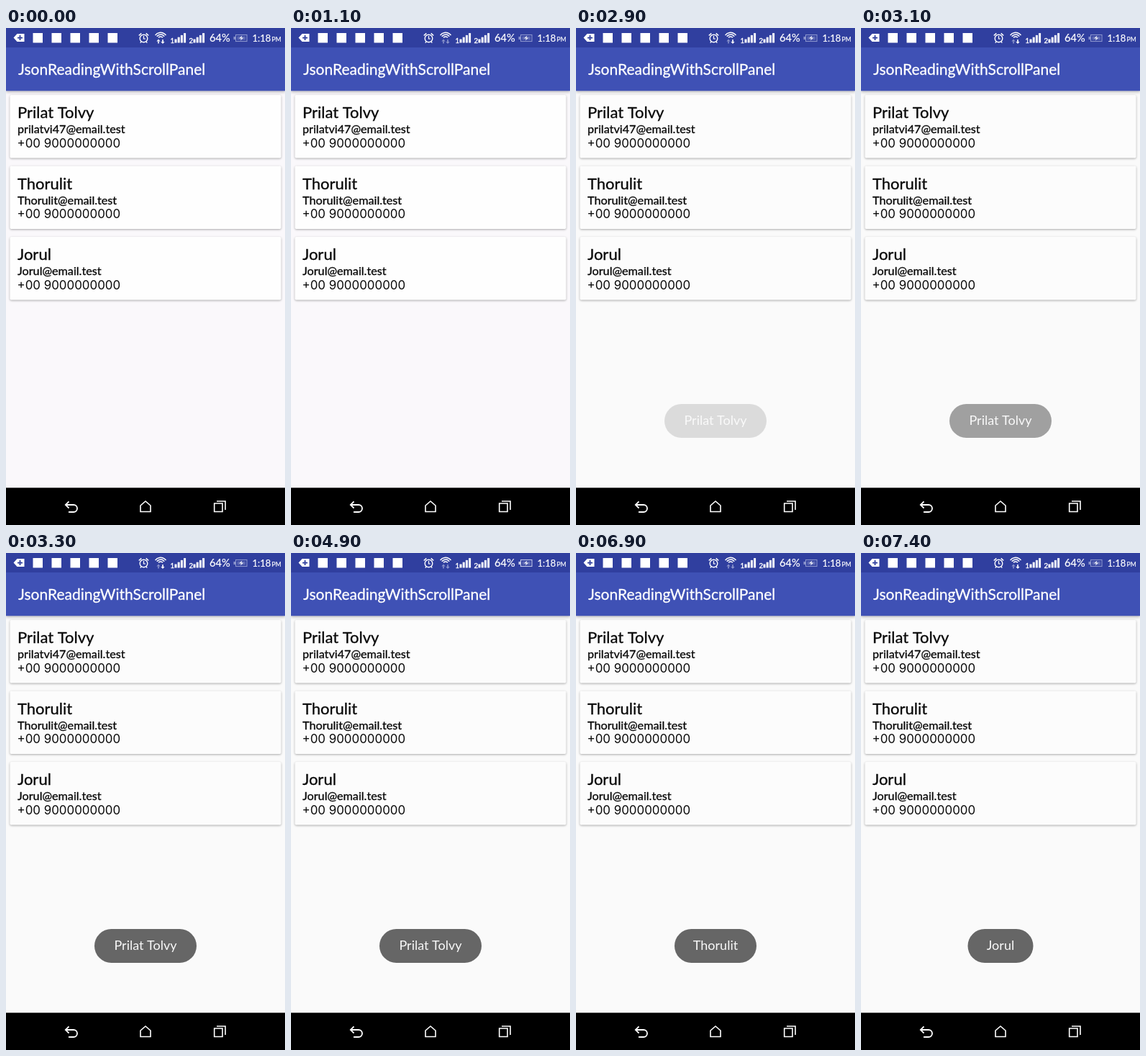
An HTML page with a canvas that plays this animation: 388 px wide and 690 px high, repeating every 8000 ms.

```html
<!DOCTYPE html>
<html lang="en">
<head>
<meta charset="utf-8">
<title>Contact list</title>
<style>
html, body { margin: 0; width: 100%; height: 100%; overflow: hidden; background: #000; }
canvas { display: block; width: 388px; height: 690px; }
</style>
</head>
<body>
<canvas id="stage"></canvas>
<script>
const W = 388, H = 690, LOOP = 8000, STEP = 100;
const BAR_END = 87.3, NAV_TOP = 638.3;
const SANS = 'Lato, "Open Sans", sans-serif';
const DIGITS = 'Inter, "Open Sans", sans-serif';
const ratio = window.devicePixelRatio || 1;

function setup(canvas) {
  canvas.width = W * ratio;
  canvas.height = H * ratio;
  const ctx = canvas.getContext('2d');
  ctx.scale(ratio, ratio);
  return ctx;
}

const screen2d = setup(document.getElementById('stage'));
const layer2d = setup(document.createElement('canvas'));
let c = screen2d;

const people = [
  { name: 'Prilat Tolvy', mail: 'prilatvi47@email.test' },
  { name: 'Thorulit', mail: 'Thorulit@email.test' },
  { name: 'Jorul', mail: 'Jorul@email.test' }
];
const PHONE = '+00 9000000000';

// fade-in start/end and fade-out start/end, in ms
const toasts = [
  { text: people[0].name, w: 142, show: [2800, 3300], hide: [5000, 5400] },
  { text: people[1].name, w: 114, show: [4900, 5300], hide: [6980, 7400] },
  { text: people[2].name, w: 91, show: [6900, 7300], hide: [9000, 9400] }
];

const ramp = (t, [a, b]) => Math.min(1, Math.max(0, (t - a) / (b - a)));
const within = (t, a, b) => t >= a && t < b;

function rect(x, y, w, h, color) {
  c.fillStyle = color;
  c.fillRect(x, y, w, h);
}

// weight is the width of an extra outline that thickens the letters
function text(s, x, y, size, color, { family = SANS, align = 'left', weight = 0 } = {}) {
  c.font = `${size}px ${family}`;
  c.textAlign = align;
  c.fillStyle = c.strokeStyle = color;
  c.fillText(s, x, y);
  if (!weight) return;
  c.lineWidth = weight;
  c.lineJoin = 'round';
  c.strokeText(s, x, y);
  c.lineJoin = 'miter';
}

function line(points, width, color = '#fff', closed = false) {
  c.beginPath();
  points.forEach(([x, y]) => c.lineTo(x, y));
  if (closed) c.closePath();
  c.lineWidth = width;
  c.strokeStyle = color;
  c.stroke();
}

function shape(points, color) {
  c.beginPath();
  points.forEach(([x, y]) => c.lineTo(x, y));
  c.closePath();
  c.fillStyle = color;
  c.fill();
}

function arc(x, y, r, a, b, width, color = '#fff') {
  c.beginPath();
  c.arc(x, y, r, a, b);
  c.lineWidth = width;
  c.strokeStyle = color;
  c.stroke();
}

function round(x, y, w, h, r, color) {
  c.beginPath();
  c.roundRect(x, y, w, h, r);
  c.fillStyle = color;
  c.fill();
}

function shadow(color, blur, dy) {
  c.shadowColor = color;
  c.shadowBlur = blur * ratio;
  c.shadowOffsetY = dy * ratio;
}

function alarm() {
  arc(191.5, 14.5, 5.3, 0, 7, 1.4);
  line([[191.5, 11], [191.5, 15], [194, 15]], 1.2);
  line([[184.8, 10.5], [188.3, 7.3]], 1.6);
  line([[198.2, 10.5], [194.7, 7.3]], 1.6);
  line([[188, 19], [186.8, 20.6]], 1.3);
  line([[195, 19], [196.2, 20.6]], 1.3);
}

function wifi(t) {
  [9.2, 6.4, 3.6].forEach(r => arc(215, 15.5, r, -Math.PI * 0.8, -Math.PI * 0.2, 1.5));
  const dim = '#8b95cc';
  const up = t < 900 ? '#fff' : dim;
  const down = t < 900 || within(t, 2600, 3900) || t >= 7300 ? '#fff' : dim;
  shape([[212, 15.5], [214.6, 18.5], [209.4, 18.5]], up);
  rect(211.2, 18.5, 1.6, 3, up);
  shape([[218, 22], [220.6, 19], [215.4, 19]], down);
  rect(217.2, 16, 1.6, 3, down);
}

function signal(x, label) {
  text(label, x, 21, 9.5, '#fff', { weight: 0.4 });
  for (let i = 0; i < 4; i++) {
    const h = 5 + i * 2.8;
    rect(x + 6 + i * 4.2, 20.5 - h, 3, h, '#fff');
  }
}

function battery(t) {
  const color = within(t, 3900, 6000) ? '#c3c9e8' : '#8a94cc';
  c.lineWidth = 1.1;
  c.strokeStyle = color;
  c.strokeRect(319.5, 9.5, 15.5, 9);
  rect(316.5, 12, 2.5, 4, color);
  rect(321.5, 11.5, 11.5, 5, '#5d69b4');
  shape([[328.3, 10.5], [324, 14.4], [327, 14.4], [326, 17.6], [330.5, 13.5], [327.6, 13.5]], '#e8eaf6');
}

function statusBar(t) {
  rect(0, 0, W, 27, '#303f9f');
  shape([[10.5, 13.5], [15.5, 8], [25.5, 8], [25.5, 19], [15.5, 19]], '#fff');
  rect(16, 12.7, 7, 1.8, '#303f9f');
  rect(18.6, 10, 1.8, 7, '#303f9f');
  for (let i = 0; i < 5; i++) rect(37.5 + i * 26, 7, 13.5, 13.5, '#fff');
  alarm();
  wifi(t);
  signal(228.5, '1');
  signal(254.5, '2');
  text('64%', 283, 19, 14.6, '#fff', { weight: 0.2 });
  battery(t);
  text('1:18', 342.5, 19, 13, '#fff', { weight: 0.2 });
  text('PM', 369.5, 19, 8.6, '#fff', { weight: 0.2 });
}

function appBar() {
  c.save();
  shadow('rgba(0,0,0,.26)', 4, 1.5);
  rect(0, 27, W, BAR_END - 27, '#3f51b5');
  c.restore();
  text('JsonReadingWithScrollPanel', 17, 65, 21, '#fff', { weight: 0.3 });
}

function card({ name, mail }, i, color) {
  const y = 93 + i * 98.5, ink = '#0a0a0a', weight = 0.35;
  c.save();
  shadow('rgba(0,0,0,.32)', 3, 1);
  round(5.4, y, 377.2, 87.5, 2, color);
  c.restore();
  text(name, 16, y + 32, 22, ink, { weight });
  text(mail, 16, y + 53, 16.2, ink, { weight });
  text(PHONE, 15.5, y + 72.5, 16.9, ink, { family: DIGITS });
}

// pill and label fade as one group, so they meet on a layer first
function toast({ text: label, w, show, hide }, t) {
  const alpha = ramp(t, show) * (1 - ramp(t, hide));
  if (!alpha) return;
  c = layer2d;
  c.clearRect(0, 0, W, H);
  round(194 - w / 2, 522, w, 47, 23.5, '#666');
  text(label, 194, 551, 18, '#f9f9f9', { align: 'center' });
  c = screen2d;
  c.globalAlpha = alpha;
  c.drawImage(layer2d.canvas, 0, 0, W, H);
  c.globalAlpha = 1;
}

function navBar() {
  rect(0, NAV_TOP, W, H - NAV_TOP, '#000');
  c.beginPath();
  c.moveTo(83, 662);
  c.lineTo(94, 662);
  c.arc(94, 667, 5, -Math.PI / 2, Math.PI / 2);
  c.lineTo(87, 672);
  c.lineWidth = 1.8;
  c.strokeStyle = '#fff';
  c.stroke();
  line([[87.5, 657.3], [82.8, 662], [87.5, 666.7]], 1.8);
  line([[187, 663], [194, 657], [201, 663], [201, 671.5], [187, 671.5]], 1.6, '#fff', true);
  line([[289.7, 660], [301, 660], [301, 671.5], [289.7, 671.5]], 1.6, '#fff', true);
  line([[293, 657], [305, 657], [305, 669]], 1.6);
}

function draw(t) {
  const early = t < 2600;
  rect(0, 0, W, H, early ? '#faf8fb' : '#fafafa');
  people.forEach((p, i) => card(p, i, early ? '#fefefe' : '#fcfcfc'));
  appBar();
  statusBar(t);
  toasts.forEach(item => toast(item, t));
  navBar();
}

const start = performance.now();
function tick() {
  const t = (performance.now() - start) % LOOP;
  draw(Math.floor(t / STEP) * STEP);
  requestAnimationFrame(tick);
}
tick();
</script>
</body>
</html>
```
